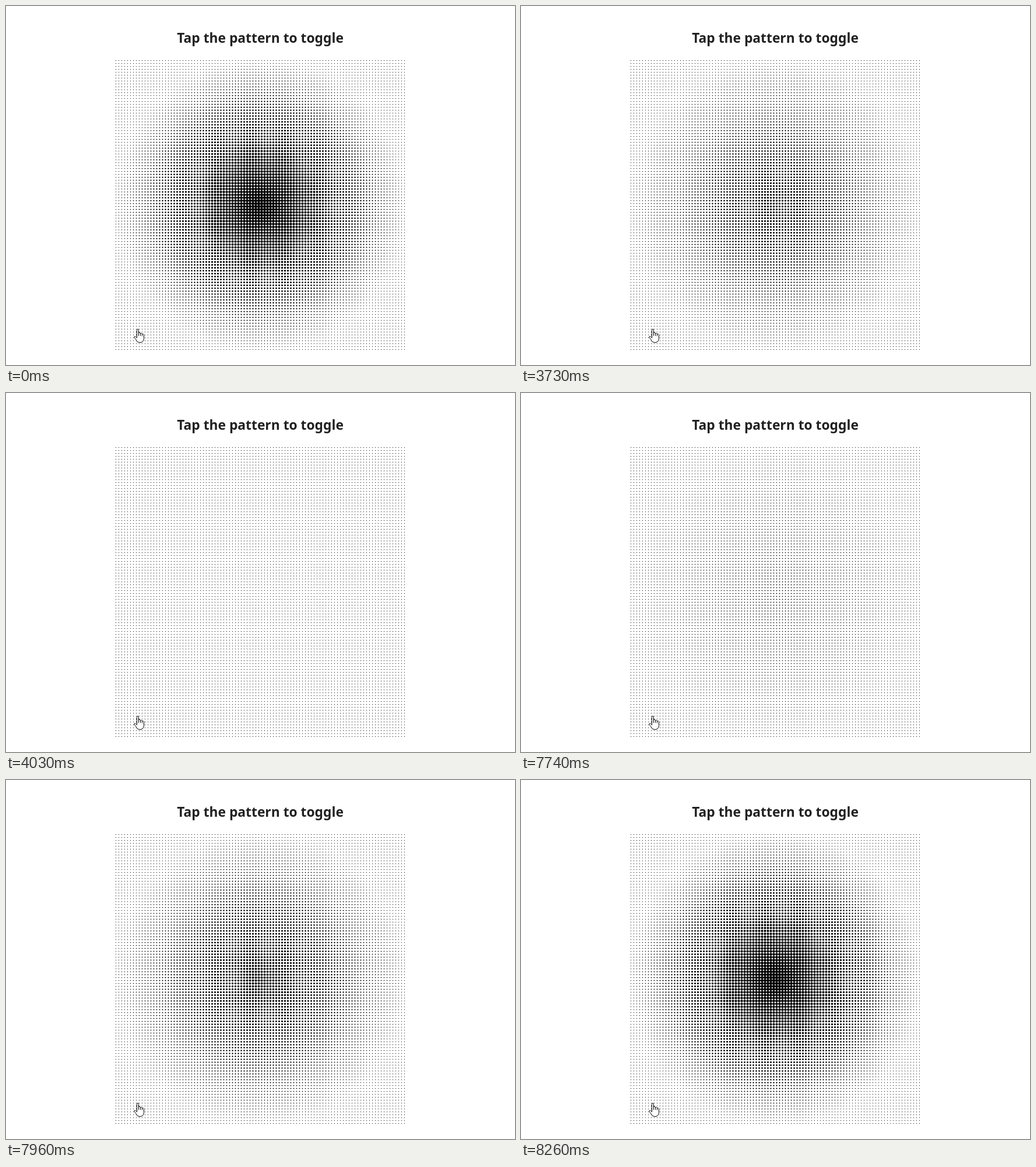
These frames come from a looping animation (873 px wide and 615 px high, 9160 ms). An HTML page with a canvas:

```html
<!DOCTYPE html>
<html lang="en">
<head>
<meta charset="utf-8">
<title>Halftone toggle</title>
<style>
  html, body { margin: 0; width: 100%; height: 100%; overflow: hidden; background: #fff; }
  canvas { position: absolute; left: 186px; top: 91px; }
  svg { position: absolute; left: 0; top: 0; }
  text { font: 700 22.8px "Noto Sans", "Open Sans", sans-serif; fill: #212121; text-anchor: middle; }
</style>
</head>
<body>
<canvas width="500" height="500"></canvas>
<svg width="873" height="615">
  <text x="436" y="63">Tap the pattern to toggle</text>
  <path fill="#fff" stroke="#000" stroke-linejoin="round" d="M224.5 568.5V555.2Q224.5 553.5 226 553.5T227.5 555.2V560.5
    Q228 559.3 229.3 559.6T230.6 561.3Q231.2 560.2 232.4 560.6T233.6 562.3Q234.3 561.5 235.4 562T236.5 564
    V569.5Q236.5 572 235 574.2Q233.5 576.5 230 576.5Q226.500 576.500 225 574.800Q223 572.500 222.500 570.500
    L219.800 567.800Q219.300 566.300 220.800 566Q222.800 566 224.500 568.500Z"/>
  <path fill="none" stroke="#000" d="M227.500 560V565M230.500 561V565M233.500 562V565.500"/>
</svg>
<script>
const LOOP = 9160, SIZE = 500, PITCH = 5, FADE = 600;
const SHRINK_START = 3450, GROW_START = 7590;
const TICKS = [0, 3530, 3630, 3730, 3830, 3930, 4030, 7740, 7860, 7960, 8060, 8160, 8260];

const ctx = document.querySelector("canvas").getContext("2d");
const image = ctx.createImageData(SIZE, SIZE);

const clamp = v => Math.min(1, Math.max(0, v));
const ease = p => p * p * (3 - 2 * p);
const progress = (time, start) => ease(clamp((time - start) / FADE));

// How far the dots have grown: 1 is the full halftone, 0 the plain grid.
function growth(time) {
  return 1 - progress(time, SHRINK_START) + progress(time, GROW_START);
}

function drawDots(amount) {
  const middle = (SIZE - 1) / 2, half = (PITCH - 1) / 2;
  for (let y = 0, k = 3; y < SIZE; y++) {
    for (let x = 0; x < SIZE; x++, k += 4) {
      const reach = clamp(1 - Math.hypot(x - middle, y - middle) / (SIZE / 2));
      const radius = 0.5 + 2.2 * amount * reach;
      const distance = Math.hypot(x % PITCH - half, y % PITCH - half);
      image.data[k] = 255 * clamp(radius - distance + 0.5);
    }
  }
  ctx.putImageData(image, 0, 0);
}

let shown;
function frame() {
  const time = performance.now() % LOOP;
  const tick = TICKS.findLast(t => t <= time);
  if (tick !== shown) drawDots(growth(shown = tick));
  requestAnimationFrame(frame);
}
frame();
</script>
</body>
</html>
```
